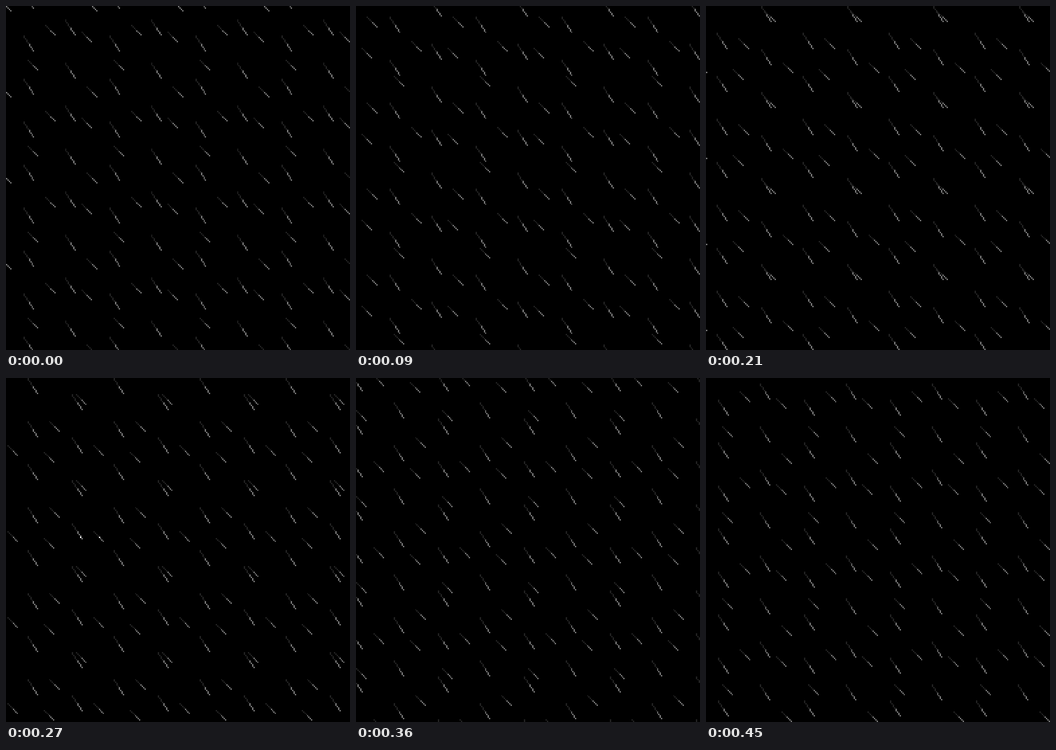
An HTML page with a canvas for the animation above (0.48 s loop, 748 by 748 pixels).

```html
<!DOCTYPE html>
<html lang="en">
<head>
<meta charset="utf-8">
<title>Pixel rain</title>
<style>
  html, body { margin: 0; width: 100%; height: 100%; overflow: hidden; background: #000; }
  canvas { display: block; width: 100vw; height: 100vh; image-rendering: pixelated; }
</style>
</head>
<body>
<canvas id="sky" width="256" height="256"></canvas>
<script>
const SIZE = 256, STEP_MS = 30, STEPS = 16;
const DIM = '#222', LIT = '#777';
const ctx = document.getElementById('sky').getContext('2d');

// Each layer repeats on its own tile and shifts by (dx, dy) every step.
const layers = [
  { tileW: 64, tileH: 64, dx: 4, dy: 4, starts: [[29, 14], [56, 19], [16, 40], [60, 60]],
    rows: 8, column: r => r },
  { tileW: 64, tileH: 32, dx: 4, dy: 6, starts: [[44, 10], [13, 22]],
    rows: 12, column: r => Math.floor(r / 3) * 2 + (r % 3 === 2 ? 1 : 0) }
];

// Spots that flash white when the lit half of a streak crosses them.
const glints = new Set(['54,118', '55,118', '69,118']);

function drawStreak(layer, x, y) {
  for (let r = 0; r < layer.rows; r++) {
    const c = layer.column(r), px = x + c, py = y + r;
    const lit = c > 3;
    ctx.fillStyle = lit && glints.has(px + ',' + py) ? '#fff' : lit ? LIT : DIM;
    ctx.fillRect(px, py, 1, 1);
  }
}

function drawLayer(layer, step) {
  const { tileW, tileH, dx, dy, starts } = layer;
  for (const [sx, sy] of starts) {
    const x0 = (sx + dx * step) % tileW - tileW;
    const y0 = (sy + dy * step) % tileH - tileH;
    for (let y = y0; y < SIZE; y += tileH)
      for (let x = x0; x < SIZE; x += tileW) drawStreak(layer, x, y);
  }
}

function draw(step) {
  ctx.fillStyle = '#000';
  ctx.fillRect(0, 0, SIZE, SIZE);
  for (const layer of layers) drawLayer(layer, step);
}

const start = performance.now();
let shown = 0;
draw(0);

function tick() {
  const step = Math.floor((performance.now() - start) / STEP_MS) % STEPS;
  if (step !== shown) draw(shown = step);
  requestAnimationFrame(tick);
}
requestAnimationFrame(tick);
</script>
</body>
</html>
```
